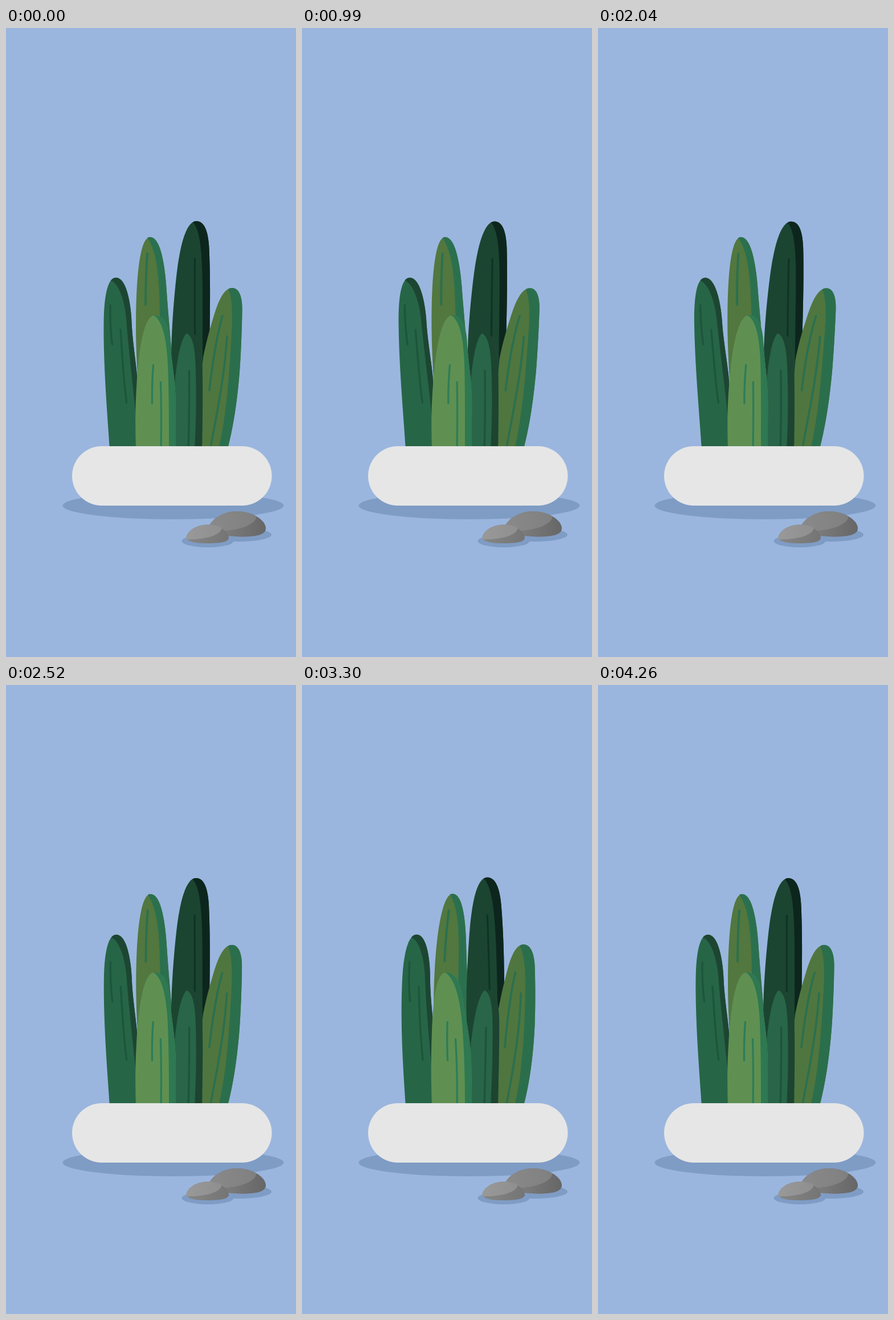
An HTML page for the animation above (5370 ms loop, 509 px wide and 1101 px high).

```html
<!DOCTYPE html>
<html lang="en">
<head>
<meta charset="utf-8">
<title>Potted plant</title>
<style>
html, body { margin: 0; width: 100%; height: 100%; overflow: hidden; background: #9ab6de; }
svg { display: block; width: 100%; height: 100%; }
.line { fill: none; stroke-linecap: round; }
</style>
</head>
<body>
<svg viewBox="0 0 509 1101" preserveAspectRatio="none">
  <defs>
    <linearGradient id="big"><stop offset=".3" stop-color="#7c7c7c"/><stop offset="1" stop-color="#666"/></linearGradient>
    <linearGradient id="small"><stop offset="0" stop-color="#868686"/><stop offset="1" stop-color="#747474"/></linearGradient>
    <linearGradient id="bigTop"><stop offset="0" stop-color="#8a8a8a"/><stop offset="1" stop-color="#808080"/></linearGradient>
    <linearGradient id="smallTop"><stop offset="0" stop-color="#999"/><stop offset="1" stop-color="#8f8f8f"/></linearGradient>
  </defs>
  <rect width="509" height="1101" fill="#9ab6de"/>
  <g fill="#7f9cc5">
    <ellipse cx="293.5" cy="836" rx="194" ry="24"/>
    <ellipse cx="409" cy="887" rx="57" ry="12"/>
    <ellipse cx="354" cy="898" rx="45.5" ry="11"/>
  </g>
  <g id="plant"></g>
  <rect x="116" y="732" width="350.5" height="104" rx="52" fill="#e6e6e6"/>
  <path fill="url(#big)" d="M354 876C362 857 383 846 405 846C432 846 456 861 456 876C456 887 438 890.500 416 890.500C395 890 370 889 354 876Z"/>
  <path fill="url(#bigTop)" d="M354 876C362 857 383 846 405 846C418 846 430 849 439 855C440 868 410 880 380 880Z"/>
  <path fill="url(#small)" d="M316.500 891C319 879 336 869.500 353 869.500C375 869.500 391 882 391 892C391 900 375 902 353 902C333 902 315 899 316.500 891Z"/>
  <path fill="url(#smallTop)" d="M316.500 892C319 879 336 869.500 353 869.500C363 869.500 371 871 378 874C381 884 358 896 316.500 895Z"/>
</svg>
<script>
const LOOP = 5370, START = 660, QUARTER = 900, STEP = 30, BASE = 735;

// top: tip height; right, left: tip shift at both ends of the sway; drop: fall per shift
const leaves = [
  { top: 366, right: -4.4, left: 12.3, drop: -0.04,
    face: '#52773f', side: '#2b704e', ink: '#2b704e', width: 3.8,
    body: 'M236 740C234 640 228 590 228 520C228 450 233 366 253 366C274 366 280 430 282 462C284 490 287 525 290 560L300 740Z',
    shade: 'M248 367C250 366 252 366 253 366C274 366 280 430 282 462C284 490 287 525 290 560L300 740L280 740C272 640 271 560 270 500C269 440 266 393 248 367Z',
    lines: ['M248 395Q245 440 245 484'] },
  { top: 338, right: 10.2, left: -9.6, drop: 0.15,
    face: '#1b4531', side: '#0d261d', ink: '#0f3324', width: 3.2,
    body: 'M300 740C292 660 289 600 290.5 550C292 500 299 425 304 400C310 365 320 338 334 338C350 338 355 360 356.5 385C359 440 358 500 357 560L350 740Z',
    shade: 'M328 340C330 338.500 332 338 334 338C350 338 355 360 356.5 385C359 440 358 500 357 560L350 740L345 740L345 500C345 420 345 358 328 340Z',
    lines: ['M331.5 404L331.5 560'] },
  { top: 455, right: 8, left: -8.6, drop: 0.11,
    face: '#50763f', side: '#2b6e4c', ink: '#2b704e', width: 3.8,
    body: 'M340 740C341 680 343 600 346 577C352 545 360 520 365 503C372 480 382 455 397 455C411 455 415 475 414.5 495C414 530 412 575 410 602C406 650 400 695 388 740Z',
    shade: 'M390 457C392 455.500 395 455 397 455C411 455 415 475 414.5 495C414 530 412 575 410 602C406 650 400 695 388 740L372 740C385 690 391 620 395 550C398 505 398 475 390 457Z',
    lines: ['M380 504C371 535 363 580 357 634', 'M388 540C383 610 372 665 359 734'] },
  { top: 437, right: -10.2, left: 8.8, drop: -0.02,
    face: '#276547', side: '#1d4632', ink: '#1d553c', width: 3.3,
    body: 'M182 740C179 690 171 600 171.5 520C171.5 480 176 437 193 437C211 437 219 480 220.5 515C222 550 229 590 231 620L232 740Z',
    shade: 'M184 442C186 439 189 437 193 437C211 437 219 480 220.5 515C222 550 229 590 231 620L232 740L230 700C220 600 215 560 211.500 515C209 478 198 447 184 442Z',
    lines: ['M183 485Q182.500 520 186.500 554', 'M201 528C204 575 207 620 211.500 656'] },
  { top: 533, right: -3.2, left: 3.6, drop: 0,
    face: '#296548', side: '#1c4431', ink: '#1d543b', width: 3.4,
    body: 'M296 740L294.500 640C297 605 305 533 321 533C338 533 342 560 344 580C346 620 345 680 344 740Z',
    shade: 'M317 534C319 533 320 533 321 533C338 533 342 560 344 580C346 620 345 680 344 740L331 740C334 680 334 640 333 600C332 560 328 540 317 534Z',
    lines: ['M321.5 600Q322 670 320 734'] },
  { top: 503, right: 7.3, left: -9, drop: 0,
    face: '#5f9052', side: '#2e7852', ink: '#2e7d58', width: 3.4,
    body: 'M228 740C227 700 226.5 670 229 630C231 590 238 503 261 503C278 503 285 522 287.5 545C290 580 298 620 298 665L298 740Z',
    shade: 'M259 503L261 503C278 503 285 522 287.5 545C290 580 298 620 298 665L298 740L286 740C286 690 286 640 284 590C282 550 276 512 259 503Z',
    lines: ['M258.500 590Q256 620 256.500 657', 'M271.5 620Q273 675 272 734'] }
];

const plant = document.getElementById('plant');
const parts = [];

function addPart(leaf, d, attrs) {
  const el = document.createElementNS('http://www.w3.org/2000/svg', 'path');
  el.setAttribute('d', d);
  for (const key in attrs) el.setAttribute(key, attrs[key]);
  plant.append(el);
  const length = el.getTotalLength(), count = Math.ceil(length / 3);
  const points = Array.from({ length: count + 1 }, (_, i) => el.getPointAtLength(length * i / count));
  parts.push({ leaf, el, points });
}

for (const leaf of leaves) {
  addPart(leaf, leaf.body, { fill: leaf.face });
  addPart(leaf, leaf.shade, { fill: leaf.side });
  for (const d of leaf.lines) addPart(leaf, d, { class: 'line', stroke: leaf.ink, 'stroke-width': leaf.width });
}

// Linear sway: rest, one end, rest, other end, rest
function swayAt(t) {
  const q = Math.min(Math.max((t - START) / QUARTER, 0), 4);
  return q < 1 ? q : q < 3 ? 2 - q : q - 4;
}

// The bend grows with the square of the height above the pot
function bend({ leaf, points }, sway) {
  const shift = sway > 0 ? sway * leaf.right : -sway * leaf.left;
  return 'M' + points.map(({ x, y }) => {
    const u = Math.max(0, (BASE - y) / (BASE - leaf.top));
    const dx = shift * u * u;
    return (x + dx).toFixed(2) + ' ' + (y + dx * leaf.drop).toFixed(2);
  }).join('L');
}

let shown = null;
function draw(now) {
  const t = Math.floor((now % LOOP) / STEP) * STEP;
  const sway = swayAt(t);
  if (sway !== shown) {
    for (const part of parts) part.el.setAttribute('d', bend(part, sway));
    shown = sway;
  }
}

const begin = performance.now();
function tick() {
  draw(performance.now() - begin);
  requestAnimationFrame(tick);
}
tick();
</script>
</body>
</html>
```
